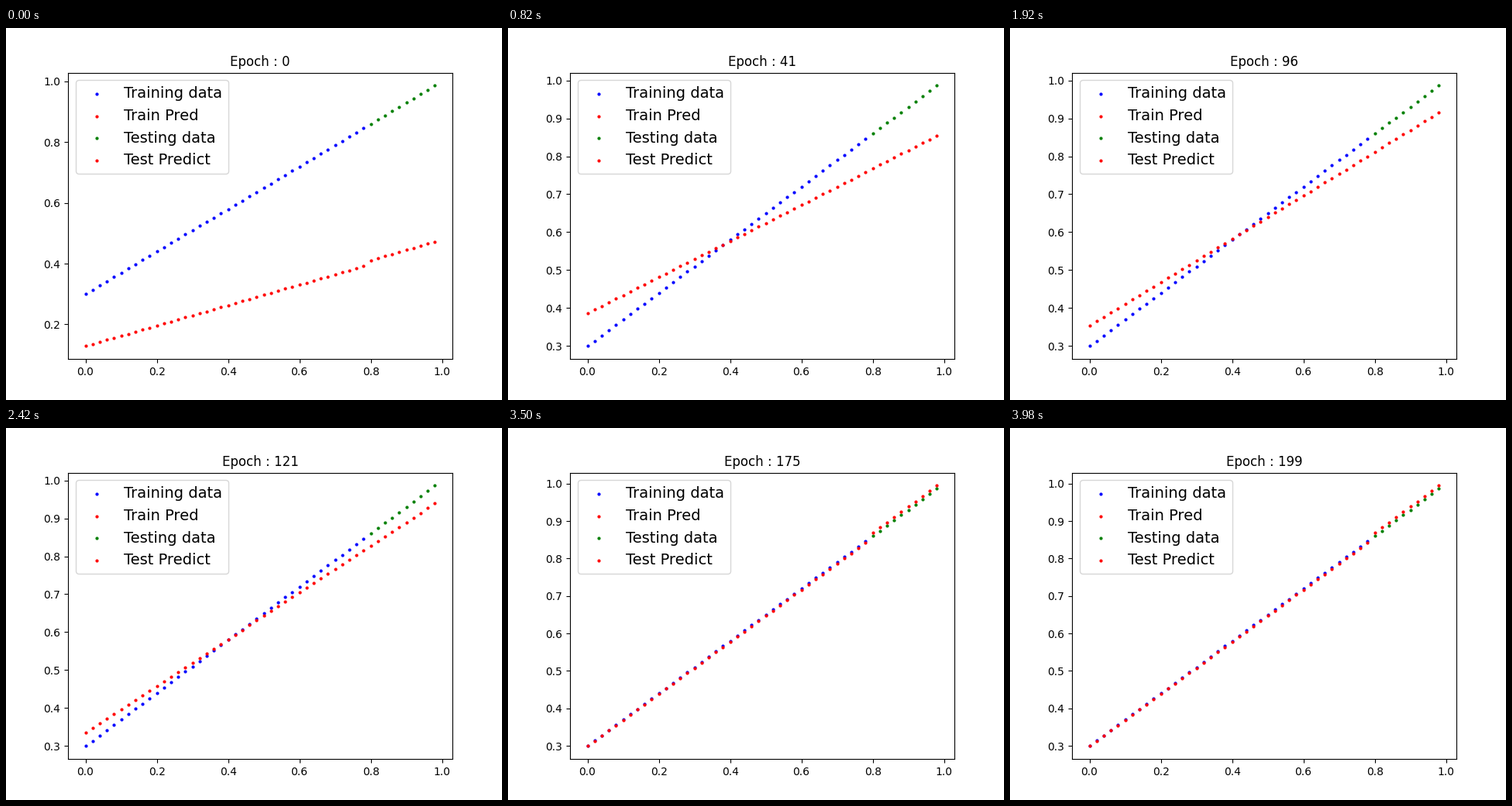
Recreate the animation shown at these times as a matplotlib script. Size 640 by 480 pixels, loop 4 s.

```python
import numpy as np
import matplotlib.pyplot as plt
from matplotlib.animation import FuncAnimation

EPOCHS = 200
SPLIT = 40
RATE = np.float32(0.01)

x = (np.arange(50) * 0.02).astype(np.float32)
y = np.float32(0.7) * x + np.float32(0.3)
x_train, x_test = x[:SPLIT], x[SPLIT:]
y_train, y_test = y[:SPLIT], y[SPLIT:]


def train(w=np.float32(0.33669038), b=np.float32(0.12880941)):
    """Fit a line by gradient descent on the mean absolute error."""
    history = []
    for _ in range(EPOCHS):
        train_pred = w * x_train + b
        sign = np.sign(train_pred - y_train)
        w = w - RATE * np.mean(sign * x_train, dtype=np.float32)
        b = b - RATE * np.mean(sign, dtype=np.float32)
        history.append((train_pred, w * x_test + b))
    return history


history = train()

fig, ax = plt.subplots(figsize=(6.4, 4.8), dpi=100)


def dots(xs, ys, color, label):
    return ax.scatter(xs, ys, c=color, s=4, label=label)


dots(x_train, y_train, "b", "Training data")
train_dots = dots(x_train, history[0][0], "r", "Train Pred")
dots(x_test, y_test, "g", "Testing data")
test_dots = dots(x_test, history[0][1], "r", "Test Predict")
ax.legend(loc="upper left", prop={"size": 14})
title = ax.set_title("Epoch : 0")


def update(epoch):
    train_pred, test_pred = history[epoch]
    train_dots.set_offsets(np.column_stack([x_train, train_pred]))
    test_dots.set_offsets(np.column_stack([x_test, test_pred]))
    shown = np.concatenate([y, train_pred, test_pred]).astype(float)
    low, high = shown.min(), shown.max()
    pad = 0.05 * (high - low)
    ax.set_ylim(low - pad, high + pad)
    title.set_text(f"Epoch : {epoch}")
    return train_dots, test_dots, title


anim = FuncAnimation(fig, update, frames=EPOCHS, interval=20,
                     repeat=True, repeat_delay=0)
plt.show()
```
